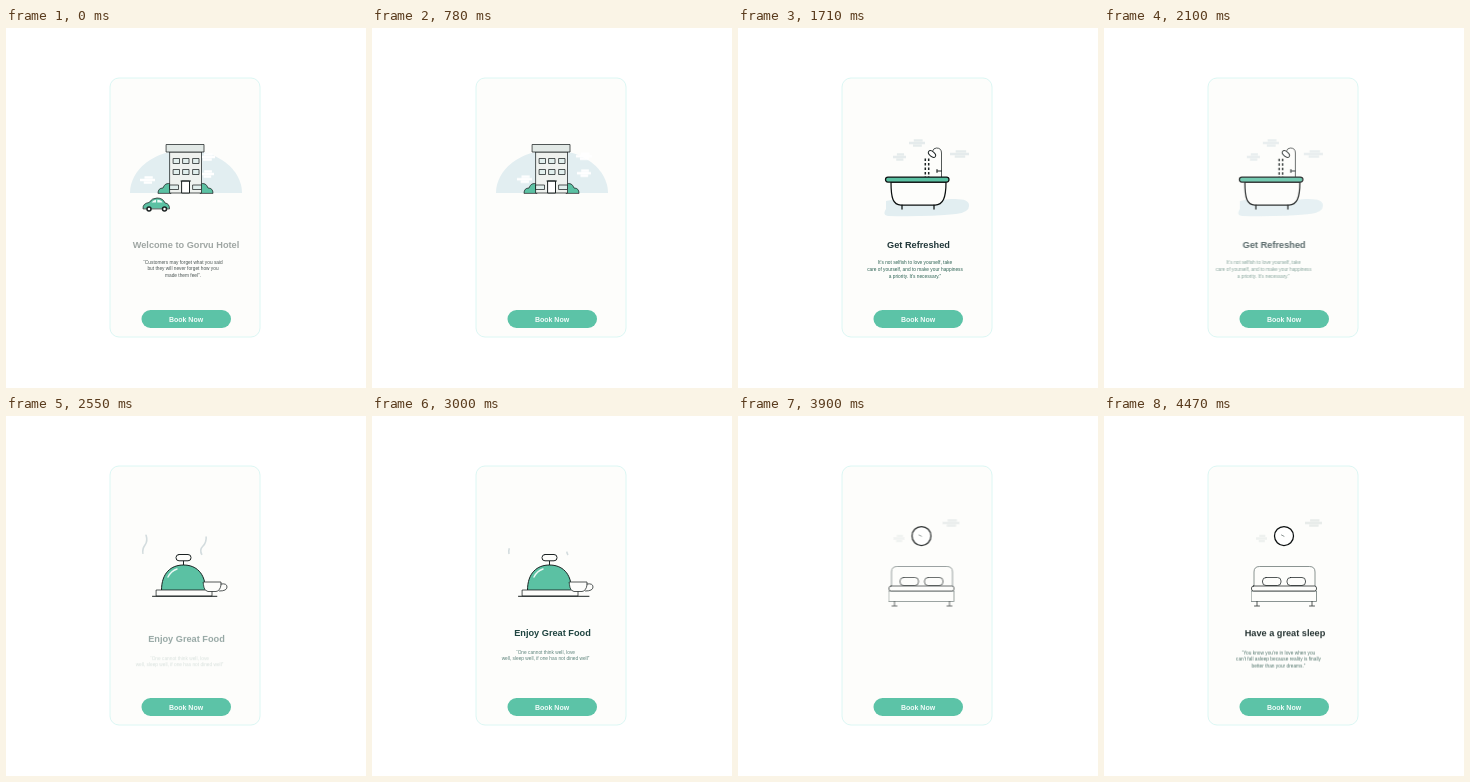
Recreate the animation shown at these times as an HTML page. Size 360 by 360 pixels, loop 4500 ms.

```html
<!DOCTYPE html>
<html lang="en">
<head>
<meta charset="utf-8">
<title>Hotel onboarding</title>
<style>
  html, body { margin: 0; width: 100%; height: 100%; overflow: hidden; background: #fff; }
  svg { display: block; width: 100vw; height: 100vh; }
  text { font-family: "Liberation Sans", Arial, sans-serif; text-anchor: middle; }
  .title { font-size: 9.2px; font-weight: 700; }
  .para { font-size: 4.8px; }
  .line { fill: none; stroke: #1b2222; stroke-width: 1; stroke-linecap: round; stroke-linejoin: round; }
  .thin { stroke-width: .75; }
  .bold { stroke-width: 1.25; stroke: #0c1010; }
  .soft { stroke-width: .75; stroke: #65706f; }
  .drops { stroke-width: 1.5; stroke-linecap: butt; }
  .cloud { fill: none; stroke-width: 2.3; }
  .steam { fill: none; stroke: #d3dcde; stroke-width: 1.6; stroke-dasharray: 20 60; }
</style>
</head>
<body>
<svg viewBox="0 0 360 360">
  <clipPath id="clip"><rect x="104" y="50" width="150" height="259" rx="9"/></clipPath>
  <rect x="104" y="50" width="150" height="259" rx="9" fill="#fdfdfb" stroke="#dcf7f4" stroke-width="1"/>
  <g id="scenes" clip-path="url(#clip)"></g>
  <rect x="135.5" y="282" width="89.5" height="18" rx="9" fill="#5cc3a7"/>
  <text x="180" y="293.6" font-size="7" font-weight="700" fill="#f4fcfa">Book Now</text>
</svg>
<script>
const LOOP = 4500;
const GREEN = '#5bc1a3', PALE = '#e2eef1', MIST = '#e5ebec', CARD = '#fdfdfb';

const cloud = (x, y, w, color) =>
  `<path class="cloud" stroke="${color}" d="M${x} ${y}h${w}M${x + w * .3} ${y - 2.7}h${w * .55}M${x + w * .25} ${y + 2.7}h${w * .55}"/>`;

const box = (x, y, w, h, fill, r = 0, cls = 'thin') =>
  `<rect class="line ${cls}" x="${x}" y="${y}" width="${w}" height="${h}" rx="${r}" style="fill:${fill}"/>`;

const windows = [130.5, 141.5].map(y =>
  [167.5, 177, 187].map(x => box(x, y, 6, 5, '#e2efed')).join('')).join('');

const hotel = `
  <ellipse cx="180" cy="165" rx="56" ry="43" fill="${PALE}" clip-path="inset(0 0 50% 0)"/>
  <g id="sky">${cloud(134, 152, 15, '#fff')}${cloud(193, 129, 16, '#fff')}${cloud(194, 146, 14, '#fff')}</g>
  <path class="line thin" style="fill:${GREEN}" d="M152 165q0-5 5-5q2-6 8-4v9zM207 165q0-5-5-5q-2-6-8-4v9z"/>
  ${box(164, 124, 31.5, 41, '#eff2ef')}
  ${box(160.5, 116.5, 37.5, 7.5, '#e2e9e6')}
  ${windows}
  ${box(164, 157, 8.5, 4.5, '#e2efed')}${box(187, 157, 8.5, 4.5, '#e2efed')}
  ${box(176, 153, 7.5, 12, '#fff', 0, '')}
  <path class="line" d="M175 153h9.5"/>`;

const car = `
  <path class="line thin" style="fill:${GREEN}" d="M137 180.5q-.5-5 6-6q3-4.5 8-4.5q6 0 8 5q4.5 .5 4.5 5.5z"/>
  <path d="M145.5 174.5q2-2.7 4.5-2.8v2.8zM151.3 171.7q4 0 5.3 2.8h-5.3z" fill="#eefaf7"/>
  <g fill="#fff" stroke="#1b2222" stroke-width="1.5"><circle cx="143" cy="181" r="2"/><circle cx="158.5" cy="181" r="2"/></g>`;

const bath = `
  <path d="M148 173q10-3 25-1t40-1q18-1 18 6q1 7-13 9q-30 3-68 2q-6-1-2-7z" fill="${PALE}"/>
  ${cloud(171, 115, 16, MIST)}${cloud(155, 129, 13, MIST)}${cloud(212, 126, 19, MIST)}
  <path class="line thin" d="M203.5 149V125q0-5-5-5q-3 0-4 3"/>
  <path class="line" d="M199 143h4.5M199 141.5v3"/>
  <ellipse class="line" cx="194" cy="126" rx="4.2" ry="2.4" style="fill:#fff" transform="rotate(40 194 126)"/>
  <path id="water" class="line drops" stroke-dasharray="2.5 2" d="M190.7 129v20M187.3 129v20"/>
  <path id="splash" class="line drops" stroke-dasharray="3 1.6" d="M154.5 132.5q6 4 8.5 12"/>
  <path class="line bold" style="fill:${CARD}" d="M153 154C153 170 155 177 163 177H197C205 177 208 170 208 154z"/>
  <path class="line bold" d="M164 177v4M196 177v4"/>
  ${box(147.5, 149, 63.5, 5, GREEN, 2.5, 'bold')}`;

const food = `
  <path id="steamL" class="steam" d="M137 138q-1-5 2-9t1-10q-1-5 3-7"/>
  <path id="steamR" class="steam" d="M196 139q-3-5 1-9t3-11q-1-4 2-7"/>
  <path class="line" d="M177.5 145v4"/>
  ${box(170, 138.5, 15, 6.3, CARD, 3, '')}
  <path class="line" style="fill:${GREEN}" d="M155.5 174C155.5 157 165 149 177.5 149S199.5 157 199.5 174z"/>
  <path d="M162 161q3-6 9-8" fill="none" stroke="#e9f8f4" stroke-width="1.5" stroke-linecap="round"/>
  ${box(150.5, 174, 55.5, 6, CARD)}
  <path class="line thin" style="fill:${CARD}" d="M197.5 166h17.5v3q-1 6-5 6.5h-8q-4-1-4.5-6.5zM215 168q6-1 6 3t-7.5 4"/>
  <path id="tray" class="line" stroke-dasharray="71 71" d="M146.5 180.3h70.5"/>`;

const bed = `
  ${cloud(201, 107, 17, '#e8ecea')}${cloud(152, 122.5, 11, '#eef1ef')}
  <circle class="line bold" cx="180" cy="120" r="9.5" style="fill:#fff"/>
  <path class="line soft" d="M180 120.3l-2.5-1.3"/>
  <path class="line soft" d="M150 171v-15q0-5.5 5.5-5.5h50q5.5 0 5.5 5.5v15"/>
  ${box(158.5, 161.5, 18.5, 8, CARD, 3.5)}${box(183, 161.5, 18.5, 8, CARD, 3.5)}
  ${box(147.5, 175, 65, 10.5, CARD, 0, 'soft')}${box(147.5, 170, 65, 5, CARD, 2)}
  <path class="line thin" d="M153 185.5v4M150.5 190h5M208 185.5v4M205.5 190h5"/>`;

const scenes = [
  { id: 'hotel', art: hotel, extra: `<g id="car">${car}</g>`, x: 180, px: 177, y: 235.5,
    title: 'Welcome to Gorvu Hotel', ink: '#9fa6a3', soft: '#4b5553',
    lines: ['“Customers may forget what you said', 'but they will never forget how you', 'made them feel”.'] },
  { id: 'bath', art: bath, x: 180.5, px: 177, y: 236,
    title: 'Get Refreshed', ink: '#22383a', soft: '#2c6253',
    lines: ["It's not selfish to love yourself, take", 'care of yourself, and to make your happiness', "a priority. It's necessary.”"] },
  { id: 'food', art: food, x: 180.5, px: 173.5, y: 237.5,
    title: 'Enjoy Great Food', ink: '#1f4440', soft: '#5d837b',
    lines: ['“One cannot think well, love', 'well, sleep well, if one has not dined well”'] },
  { id: 'bed', art: bed, x: 181, px: 174.5, y: 235.5,
    title: 'Have a great sleep', ink: '#22302f', soft: '#2f5a50',
    lines: ["“You know you're in love when you", "can't fall asleep because reality is finally", 'better than your dreams.”'] }
];

const $ = id => document.getElementById(id);

$('scenes').innerHTML = scenes.map(s => `
  <g id="${s.id}Art">${s.art}</g>${s.extra || ''}
  <text id="${s.id}Title" class="title" x="${s.x}" y="220.2" fill="${s.ink}">${s.title}</text>
  <text id="${s.id}Para" class="para" fill="${s.soft}">${s.lines.map((l, i) =>
    `<tspan x="${s.px}" y="${s.y + i * 6.75}">${l}</tspan>`).join('')}</text>`).join('');

const start = document.timeline.currentTime || performance.now();

// Each step is [ms, value]; the first and last values are held to the loop ends.
function run(id, steps, frame, easing = 'ease-in-out') {
  const all = [[0, steps[0][1]], ...steps, [LOOP, steps[steps.length - 1][1]]];
  const frames = all.map(([t, v]) => ({ offset: t / LOOP, easing, ...frame(v) }));
  $(id).animate(frames, { duration: LOOP, iterations: Infinity }).startTime = start;
}

const pose = ([x, y, o]) => ({ transform: `translate(${x}px, ${y}px)`, opacity: o });
const dash = v => ({ strokeDashoffset: v });
const fade = v => ({ opacity: v });

const REST = [0, 0, 1], RIGHT = [24, 0, 0], LEFT = [-24, 0, 0], FAR_LEFT = [-40, 0, 0];
const UP_TITLE = [0, 11, 0], UP_PARA = [0, 8, 0];

// Enter from one pose, rest, leave to another; times are [start, duration].
function show(id, enter, from, leave, to) {
  const steps = [];
  if (enter) steps.push([enter[0], from], [enter[0] + enter[1], REST]);
  if (leave) steps.push([leave[0], REST], [leave[0] + leave[1], to]);
  run(id, steps, pose);
}

show('hotelArt', null, null, [800, 200], LEFT);
show('hotelTitle', null, null, [470, 270], LEFT);
show('hotelPara', null, null, [400, 300], LEFT);
run('car', [[0, REST], [620, [110, 0, 1]], [621, [110, 0, 0]]], pose, 'ease-in');
run('sky', [[0, REST], [1000, [14, -1, 1]]], pose, 'linear');

show('bathArt', [900, 260], RIGHT, [2028, 270], [-80, 0, 0]);
show('bathTitle', [890, 400], UP_TITLE, [1995, 300], FAR_LEFT);
show('bathPara', [1014, 410], UP_PARA, [1962, 300], FAR_LEFT);
run('water', [[900, 0], [2400, -36]], dash, 'linear');
run('splash', [[1120, 0], [1200, 1], [1340, 1], [1420, 0]], fade);

show('foodArt', [2250, 260], RIGHT, [3393, 300], LEFT);
show('foodTitle', [2360, 400], UP_TITLE, [3480, 270], LEFT);
show('foodPara', [2405, 440], UP_PARA, [3285, 300], LEFT);
run('tray', [[2260, 71], [2630, 0]], dash);
run('steamL', [[2250, 20], [2550, 0], [2900, -30], [2901, 20], [3480, -14], [3750, -30]], dash, 'linear');
run('steamR', [[2250, 20], [2550, 0], [2900, -30], [2901, 20], [3480, 0], [3750, -14]], dash, 'linear');

show('bedArt', [3680, 300], RIGHT);
show('bedTitle', [4160, 340], UP_TITLE);
run('bedPara', [[4220, UP_PARA], [LOOP, [0, 2.4, .85]]], pose);
</script>
</body>
</html>
```
